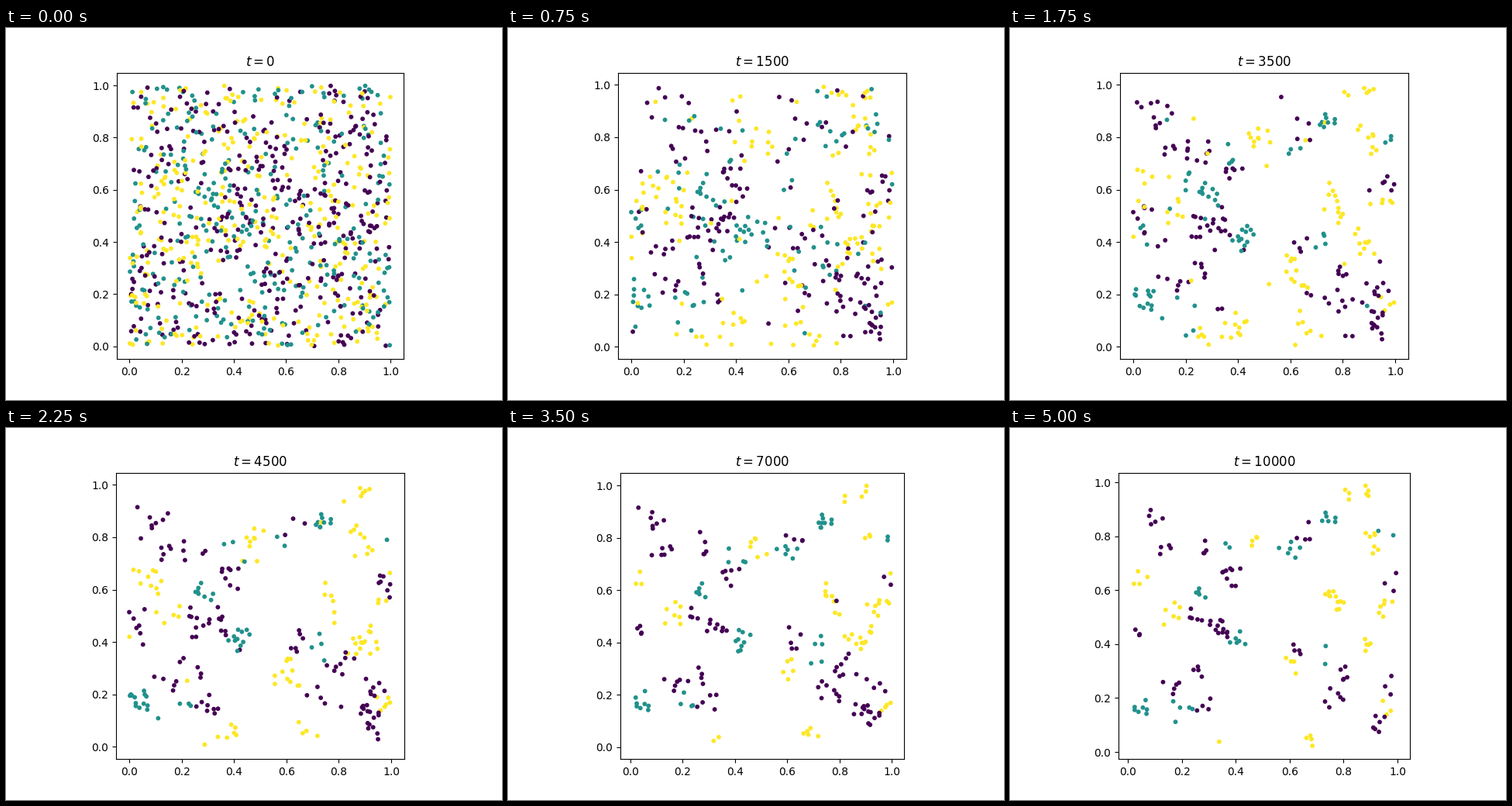
Animation of 640x480 px, one loop 5250 ms. Source, as a matplotlib script:

```python
import numpy as np
import matplotlib.pyplot as plt
from matplotlib.animation import FuncAnimation

FRAMES, STEP, N = 21, 500, 1000
rng = np.random.default_rng(5)

# Centres that each of the three groups gathers around
CENTRES = [
    [(.08, .87), (.15, .77), (.26, .76), (.23, .51), (.34, .45), (.39, .66),
     (.03, .445), (.26, .28), (.15, .26), (.3, .185), (.64, .82), (.64, .4),
     (.97, .61), (.82, .31), (.76, .2), (.95, .24), (.91, .11)],
    [(.38, .735), (.27, .605), (.41, .42), (.05, .15), (.2, .15), (.61, .75),
     (.76, .87), (.72, .375), (.975, .83)],
    [(.05, .635), (.17, .5), (.47, .77), (.33, .045), (.62, .3), (.67, .045),
     (.84, .965), (.9, .78), (.77, .56), (.95, .54), (.89, .4), (.985, .17)],
]


def distances(a, b):
    return np.linalg.norm(a[:, None] - b[None], axis=2)


centres = np.concatenate(CENTRES)
groups = np.repeat(np.arange(3), [len(c) for c in CENTRES])
sites = rng.random((N, 2))
gaps = distances(sites, centres)
gap, home = gaps.min(axis=1), groups[gaps.argmin(axis=1)]
start = rng.choice(3, N, p=[.38, .3, .32])
resist = rng.random(N)
neighbours = np.argsort(distances(sites, sites), axis=1)[:, :6]


def drift(rho=.8):
    """Slowly changing noise, partly shared between neighbouring sites."""
    state = rng.normal(size=N)
    while True:
        yield .6 * state + .8 * state[neighbours].mean(axis=1)
        state = rho * state + np.sqrt(1 - rho ** 2) * rng.normal(size=N)


luck = [noise for _, noise in zip(range(FRAMES), drift())]


def extent(t):
    """Low and high corner of the data; the outer sites empty in stages."""
    if t < 1500:
        return np.array([(.001, .001), (1, .999)])
    if t < 6000:
        return np.array([(0, .003), (1, .997)])
    if t < 8500:
        return np.array([(.011, .004), (.998, .999)])
    return np.array([(.014, .022), (.997, .988)])


def occupied(k, low, high):
    t = k * STEP
    count = int(N * (1 + t / 300) ** -.47)
    score = luck[k] - .006 * t * gap
    inside = ((sites >= low) & (sites <= high)).all(axis=1)
    score[~inside] = -np.inf
    return np.sort(np.argsort(-score)[:min(count, inside.sum())])


fig, ax = plt.subplots(figsize=(6.4, 4.8), dpi=100)


def draw(k):
    t = k * STEP
    low, high = extent(t)
    idx = occupied(k, low, high)
    color = np.where(resist < 1 - np.exp(-t / 1500), home, start)
    ax.clear()
    ax.scatter(*sites[idx].T, c=color[idx], s=10, cmap="viridis", vmin=0, vmax=2)
    pad = .05 * (high - low)
    ax.set_xlim(low[0] - pad[0], high[0] + pad[0])
    ax.set_ylim(low[1] - pad[1], high[1] + pad[1])
    ax.set_aspect("equal")
    ax.set_title(f"$t = {t}$")
    return []


anim = FuncAnimation(fig, draw, frames=FRAMES, init_func=lambda: [],
                     interval=250, repeat=True, repeat_delay=0)
plt.show()
```
